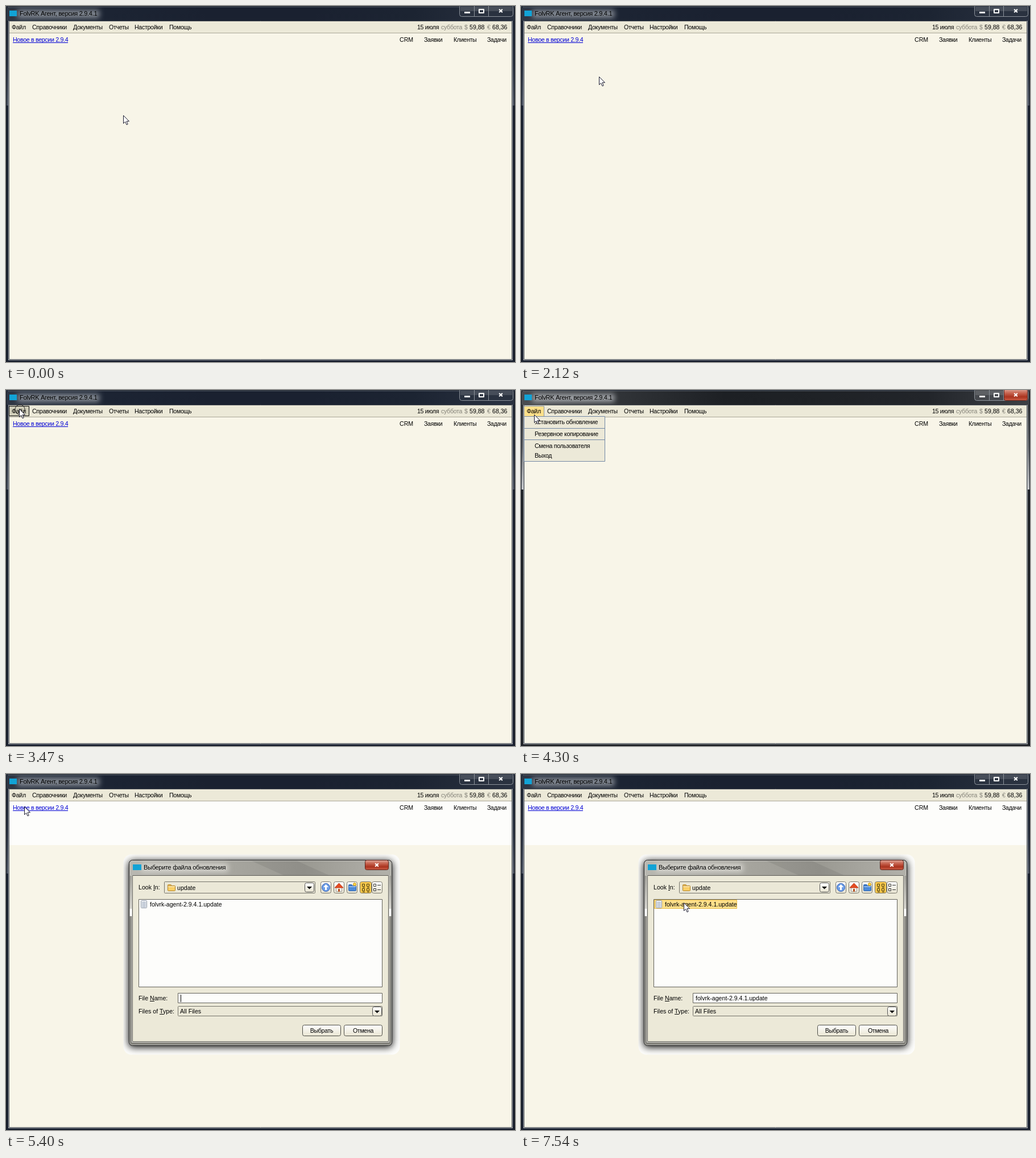
These frames come from a looping animation (895x626 px, 8000 ms). An HTML page with a canvas:

```html
<!DOCTYPE html>
<html lang="ru">
<head>
<meta charset="utf-8">
<style>
html, body { margin: 0; width: 100%; height: 100%; overflow: hidden; background: #1a2130; }
canvas { display: block; }
</style>
</head>
<body>
<canvas id="stage" width="895" height="626"></canvas>
<script>
const ctx = document.getElementById('stage').getContext('2d');
const LOOP = 8000, STEP = 134;
const CREAM = '#f8f5e8', PANEL = '#ece9d8', WHITE = '#fdfdfb', YELLOW = '#fee08a';
const LINE = '#62615a', LOGO = '#12a3d6', BLUE = '#0000d4', GRAY = '#858379';
const FILE = 'folvrk-agent-2.9.4.1.update';

const speedUp = u => u * u;
const slowDown = power => u => 1 - (1 - u) ** power;

// Pointer moves, each made in a few visible steps
const home = { x: 206, y: 192 };
const moves = [
  { at: 1310, steps: 7, x: 137, y: 124, ease: speedUp },
  { at: 2250, steps: 8, x: 23, y: 33, ease: slowDown(1.4) },
  { at: 4300, steps: 3, x: 23, y: 55, ease: slowDown(1.5) },
  { at: 4720, steps: 1, x: 32, y: 57, ease: speedUp },
  { at: 5820, steps: 5, x: 150, y: 158, ease: speedUp },
  { at: 6460, steps: 5, x: 286, y: 226, ease: slowDown(3) }
];

function pointerAt(t) {
  let { x, y } = home;
  for (const m of moves) {
    if (t < m.at) break;
    const k = Math.min(m.steps, Math.floor((t - m.at) / STEP) + 1);
    const u = m.ease(k / m.steps);
    x += (m.x - x) * u;
    y += (m.y - y) * u;
  }
  return [Math.round(x), Math.round(y)];
}

function rect(x, y, w, h, fill) {
  ctx.fillStyle = fill;
  ctx.fillRect(x, y, w, h);
}

// Filled box with a one-pixel outline on whole pixels
function box(x, y, w, h, fill, line, r = 0) {
  ctx.beginPath();
  ctx.roundRect(x + .5, y + .5, w - 1, h - 1, r);
  paint(fill, line);
}

function poly(points, fill, line) {
  ctx.beginPath();
  points.forEach(([x, y]) => ctx.lineTo(x, y));
  ctx.closePath();
  paint(fill, line);
}

function disc(x, y, r, fill, line) {
  ctx.beginPath();
  ctx.arc(x, y, r, 0, 2 * Math.PI);
  paint(fill, line);
}

function paint(fill, line) {
  ctx.lineWidth = 1;
  if (fill) { ctx.fillStyle = fill; ctx.fill(); }
  if (line) { ctx.strokeStyle = line; ctx.stroke(); }
}

// Evenly spaced colours, downwards or to the right
function blend(x, y, w, h, ...colors) {
  const g = ctx.createLinearGradient(x, y, x + w, y + h);
  colors.forEach((c, i) => g.addColorStop(i / (colors.length - 1), c));
  return g;
}
const down = (y, h, ...colors) => blend(0, y, 0, h, ...colors);
const across = (x, w, ...colors) => blend(x, 0, w, 0, ...colors);

function setFont(s, size = 10.6) {
  ctx.font = `${size}px "Liberation Sans", Arial, sans-serif`;
  ctx.letterSpacing = /[а-я]/i.test(s) ? '-0.3px' : '0px';
  return ctx.measureText(s).width;
}

function text(s, x, y, color = '#000', size) {
  const width = setFont(s, size);
  ctx.fillStyle = color;
  ctx.fillText(s, x, y);
  return width;
}

// Labels side by side; words in the muted list are gray
const muted = ['суббота', '$', '€'];
function row(words, x, y, gap) {
  for (const s of words) x += text(s, Math.round(x), y, muted.includes(s) ? GRAY : '#000') + gap;
}

function rowEndingAt(words, right, y, gap) {
  const width = words.reduce((sum, s) => sum + setFont(s) + gap, -gap);
  row(words, right - width, y, gap);
}

// Label with one underlined letter
function label(s, y, key) {
  const i = s.indexOf(key);
  text(s, 233, y);
  rect(Math.round(233 + setFont(s.slice(0, i))), y + 1, Math.ceil(setFont(key)), 1, '#000');
}

function title(s, x, y, color) {
  ctx.save();
  ctx.filter = 'blur(5px)';
  rect(x - 4, y - 10, setFont(s, 11) + 8, 14, color);
  ctx.restore();
  text(s, x, y, '#000', 11);
}

function closeButton(x, y, w, h, fill) {
  if (fill) box(x, y, w, h, down(y, h, '#deab9e', '#c96753', '#ab331f', '#cd6149'), '#62231a', 3);
  ctx.save();
  ctx.translate(x + w / 2, y + h / 2);
  ctx.rotate(Math.PI / 4);
  rect(-4, -1, 8, 2, '#fff');
  rect(-1, -4, 2, 8, '#fff');
  ctx.restore();
}

function frame(active) {
  rect(0, 0, 895, 626, active ? '#202328' : '#1a2130');
  rect(0, 0, 895, 26, active
    ? across(0, 895, '#4b4e52', '#303337', '#1d2024', '#1f2226', '#22252a', '#3d4045')
    : across(0, 895, '#2f3745', '#1c2433', '#1a2130', '#1a2130', '#1c2432', '#2a3241'));
  const side = active ? down(26, 149, '#34373b', '#63666b', '#c9cbce')
    : down(26, 149, '#1d2534', '#293140', '#4d5462');
  rect(0, 26, 5, 149, side);
  rect(890, 26, 5, 149, side);
  box(0, 0, 895, 640, null, '#10151e', 5);
  rect(3, 1, 889, 1, '#59616d');
  title('FolvRK Агент, версия 2.9.4.1', 24, 17, active ? '#a3a6aa' : '#868c95');
  rect(6, 8, 13, 10, LOGO);

  box(797, -3, 95, 22, active ? '#45484d' : '#2a3240', '#8d939b', 4);
  rect(799, 1, 91, 8, 'rgba(255,255,255,.13)');
  closeButton(849, -2, 42, 21, active);
  rect(823, 0, 1, 18, '#8d939b');
  rect(848, 0, 1, 18, '#8d939b');
  rect(806, 10, 10, 3, '#f4f4f4');
  box(831, 5, 10, 8, null, '#fff');
  box(832, 6, 8, 6, null, '#fff');

  box(4, 26, 887, 597, CREAM, '#a9adb1');
  box(5, 26, 885, 596, null, '#4c5158');
  rect(6, 27, 883, 20, PANEL);
  rect(6, 47, 883, 1, '#aaa798');
}

function bars(hover, open, washed) {
  if (washed) rect(6, 48, 883, 77, WHITE);
  if (hover === 'second') box(40, 28, 71, 18, '#cfcdb9', '#000');
  if (hover === 'first') box(5, 28, 36, 18, '#cfcdb9', '#000');
  if (open) box(5, 28, 36, 19, YELLOW, '#8b96a3');
  row(['Файл', 'Справочники', 'Документы', 'Отчеты', 'Настройки', 'Помощь'], 10, 41, 11);
  rowEndingAt(['15 июля', 'суббота', '$', '59,88', '€', '68,36'], 882, 41, 3.8);
  rowEndingAt(['CRM', 'Заявки', 'Клиенты', 'Задачи'], 880, 63, 19);
  const width = text('Новое в версии 2.9.4', 12, 63, BLUE);
  rect(12, 64, Math.round(width), 1, BLUE);
}

function dropdown(selected) {
  box(5, 46, 143, 80, PANEL, '#7288a5');
  rect(6, 67, 141, 1, '#7288a5');
  rect(6, 87, 141, 1, '#7288a5');
  if (selected) box(7, 48, 140, 18, YELLOW, '#667f9e');
  ['Установить обновление', 'Резервное копирование', 'Смена пользователя']
    .forEach((s, i) => text(s, 24, 60 + 21 * i));
  text('Выход', 24, 119);
}

function arrowButton(x, y) {
  box(x, y, 17, 17, down(y, 17, '#fff', '#e6e2ce'), '#555', 3);
  poly([[x + 4, y + 7], [x + 13, y + 7], [x + 8.5, y + 11.5]], '#000');
}

function button(s, x) {
  box(x, 441, 68, 20, down(441, 20, '#fff', '#e9e5d2'), '#4c4c46', 3);
  text(s, x + 34 - setFont(s) / 2, 455);
}

function folder(x, color, edge) {
  box(x, 194, 7, 5, color, edge, 1);
  box(x, 196, 14, 10, color, edge, 1);
  rect(x + 1, 197, 12, 2, '#fff6');
}

function toolIcons() {
  const light = down(189, 21, '#fff', '#e5e1ce');
  for (const x of [553, 576, 599, 643]) box(x, 189, 19, 21, light, '#77756b', 3);
  box(622, 189, 21, 21, '#fbc94b', '#77756b', 3);

  disc(562.5, 199.5, 7, '#6e9fe8', '#2c59ae');
  poly([[558, 199], [562.5, 194], [567, 199]], '#fff');
  rect(561, 199, 3, 5, '#fff');

  box(580, 198, 11, 9, '#f9f4ea', '#999');
  poly([[578, 200], [585.5, 192], [593, 200]], '#e64d22', '#bd3516');
  rect(584, 202, 3, 5, '#b55323');

  folder(602, '#4c8ad8', '#2860ab');
  disc(613, 194, 2.5, '#ffd845', '#c79013');

  for (const y of [193, 201]) {
    for (const x of [626, 634]) {
      box(x, y, 5, 5, null, '#443910');
      rect(x + 1, y + 6, 4, 1, '#443910');
    }
    box(646, y, 5, 5, null, '#333');
    rect(653, y + 2, 6, 1, '#333');
  }
}

function dialogFrame() {
  ctx.save();
  box(206, 141, 487, 353, WHITE, null, 14);
  ctx.clip();
  ctx.shadowColor = '#000';
  ctx.shadowBlur = 13;
  ctx.shadowOffsetY = 2;
  box(216, 151, 463, 327, '#8b8a83', '#1c1c1a', 6);
  ctx.restore();

  ctx.save();
  box(217, 152, 461, 325, null, null, 5);
  ctx.clip();
  rect(217, 152, 461, 27, across(217, 461, '#b9b8b1', '#a9a8a1', '#9a9992', '#b2b1aa'));
  poly([[430, 152], [510, 152], [570, 179], [490, 179]], 'rgba(70,70,65,.12)');
  for (const x of [217, 674]) {
    rect(x, 179, 5, 58, down(179, 58, '#96958e', '#d0cfc9'));
    rect(x, 237, 5, 13, '#fff');
  }
  ctx.restore();
  box(217, 152, 461, 325, null, 'rgba(255,255,255,.45)', 5);
  title('Выберите файла обновления', 242, 168, '#d6d5cf');
  rect(223, 159, 15, 10, LOGO);
  closeButton(631, 151, 42, 18, true);
  box(221, 178, 453, 294, PANEL, '#dddcd6');
  box(222, 178, 451, 293, null, '#5f5e59');
}

function dialog(chosen, named, caret) {
  dialogFrame();
  label('Look In:', 203, 'I');
  box(278, 189, 266, 21, '#ebe8d7', '#74736a', 1);
  folder(284, '#f9cf67', '#b0822a');
  text('update', 301, 204);
  arrowButton(525, 191);
  toolIcons();

  box(233, 220, 429, 155, WHITE, LINE);
  if (chosen) box(234, 221, 146, 16, YELLOW, '#e9bd4b');
  box(237, 222, 11, 14, '#f4f6fa', '#8a94a3', 1);
  for (let y = 225; y < 235; y += 2) rect(239, y, 7, 1, '#9ba8ba');
  text(FILE, 253, 233);

  label('File Name:', 398, 'N');
  box(302, 385, 360, 18, WHITE, LINE);
  if (named) text(FILE, 307, 398);
  else if (caret) rect(307, 388, 1, 13, '#000');
  label('Files of Type:', 421, 'T');
  box(302, 408, 360, 18, '#ebe8d7', '#74736a', 1);
  text('All Files', 306, 421);
  arrowButton(644, 409);
  button('Выбрать', 521);
  button('Отмена', 594);
}

function pointer(x, y) {
  ctx.save();
  ctx.translate(x + .5, y + .5);
  poly([[0, 0], [0, 14], [3.2, 11], [5.5, 16.3], [7.7, 15.4], [5.5, 10.2], [10, 10.2]], '#fff', '#1c1c30');
  ctx.restore();
}

function draw(t) {
  const during = (from, to) => t >= from && t < to;
  const open = during(3590, 5400);
  frame(open);
  bars(during(2910, 3060) ? 'second' : during(3060, 3590) ? 'first' : '', open, t >= 5400);
  if (open) dropdown(t >= 4430);
  if (t >= 5400) dialog(t >= 7290, t >= 7540, (t - 5370) % 940 < 450);
  const [x, y] = pointerAt(t);
  if (during(3470, 3740) || during(5000, 5280) || during(7290, 7540)) disc(x + 1.5, y + 1.5, 8.7, null, '#222');
  pointer(x, y);
}

const start = performance.now();
function tick() {
  draw((performance.now() - start) % LOOP);
  requestAnimationFrame(tick);
}
tick();
</script>
</body>
</html>
```
